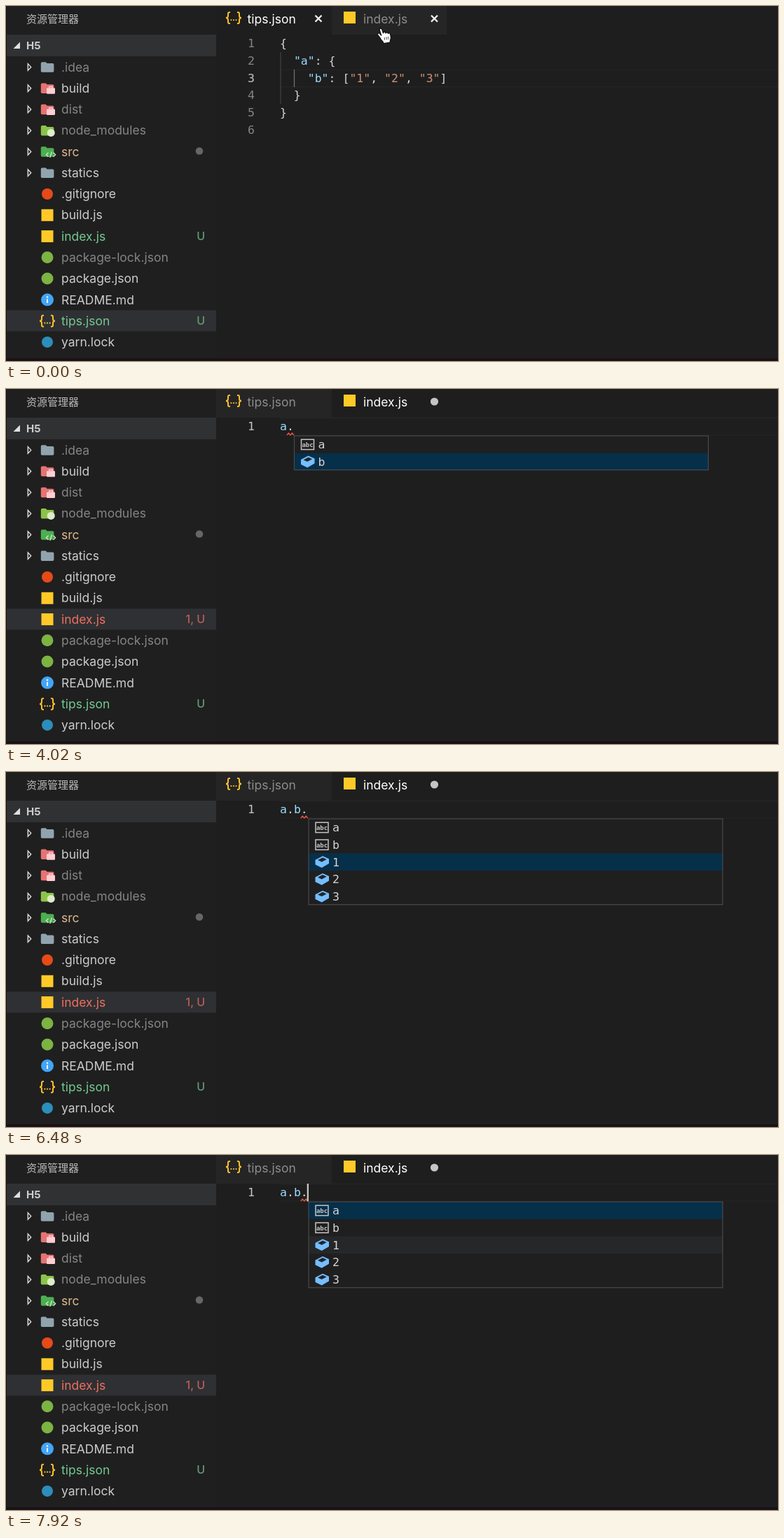
Write an HTML page that moves like this. It is 1102 px wide and 508 px high and loops after 7.98 s.

```html
<!DOCTYPE html>
<html lang="zh">
<head>
<meta charset="utf-8">
<title>Editor completion</title>
<style>
  html, body { margin: 0; width: 100%; height: 100%; overflow: hidden; background: #1e1e1e; }
  svg { display: block; }
  text { white-space: pre; }
  .ui { font: 17.5px Inter, sans-serif; }
  .code { font: 16.5px "DejaVu Sans Mono", monospace; }
</style>
</head>
<body>
<svg id="stage" width="1102" height="508" viewBox="0 0 1102 508"></svg>
<script>
const LOOP = 7980;
const CODE_X = 391, CHAR = 9.93, LINE = 24.7, ROW = 30.27;
const BLUE = '#9cdcfe', ORANGE = '#ce9178', PLAIN = '#d4d4d4';
const GREEN = '#73c991', RED = '#ee6f60', DIM = '#858585', NORMAL = '#cccccc';

const rect = (x, y, w, h, fill, more = '') =>
  `<rect x="${x}" y="${y}" width="${w}" height="${h}" fill="${fill}" ${more}/>`;
const circle = (x, y, r, fill, more = '') =>
  `<circle cx="${x}" cy="${y}" r="${r}" fill="${fill}" ${more}/>`;
const path = (d, fill, more = '') => `<path d="${d}" fill="${fill}" ${more}/>`;
const line = (d, color, w) => path(d, 'none', `stroke="${color}" stroke-width="${w}"`);
const text = (x, y, s, fill, cls = 'ui', more = '') =>
  `<text x="${x}" y="${y}" fill="${fill}" class="${cls}" ${more}>${s}</text>`;
const group = (id, body, x = 0, y = 0) =>
  `<g ${id ? `id="${id}"` : ''} transform="translate(${x} ${y})">${body}</g>`;
const tint = (s, color) => `<tspan fill="${color}">${s}</tspan>`;

// Icons are drawn around their centre.
const folder = color =>
  path('M-7.4-7.2h5.1l1.9 1.9h8q1.8 0 1.8 1.8v9q0 1.8-1.8 1.8h-15q-1.8 0-1.8-1.8v-10.9q0-1.8 1.8-1.8z', color);
const redFolder = folder('#e57373') +
  rect(-1, -0.5, 12, 8.5, '#ffcdd2', 'rx="1.2"') +
  line('M2.7 0v-2.2h4.6v2.2', '#ffcdd2', 1.4);
const icons = {
  grey: folder('#90a4ae'),
  red: redFolder,
  lime: folder('#8bc34a') + circle(5.2, 3.2, 5.5, '#dcedc8'),
  source: folder('#4caf50') +
    line('M1.5 1.2l-3 3 3 3M8.5 1.2l3 3-3 3M6.4 0l-2.6 8.4', '#c8e6c9', 1.5),
  orange: circle(0, 0, 8, '#e64a19'),
  yellow: rect(-8.5, -8.5, 17, 17, '#ffca28'),
  green: circle(0, 0, 8.5, '#7cb342'),
  cyan: circle(0, 0, 8, '#2c8ebb'),
  info: circle(0, 0, 9, '#42a5f5') + rect(-1, -1, 2, 5.5, '#fff') + circle(0, -3.8, 1.2, '#fff'),
  braces: line('M-5-8h-1q-2 0-2 2v3q0 3-3 3q3 0 3 3v3q0 2 2 2h1M5-8h1q2 0 2 2v3q0 3 3 3q-3 0-3 3v3q0 2-2 2h-1', '#fbc02d', 2) +
    [-3.6, 0, 3.6].map(x => circle(x, 3, 1.1, '#fbc02d')).join('')
};
const icon = (name, x, y) => group('', icons[name], x, y);

const files = [
  ['.idea', 'grey', DIM, 1], ['build', 'red', NORMAL, 1], ['dist', 'red', DIM, 1],
  ['node_modules', 'lime', DIM, 1], ['src', 'source', '#deb98c', 1], ['statics', 'grey', NORMAL, 1],
  ['.gitignore', 'orange', NORMAL], ['build.js', 'yellow', NORMAL], ['index.js', 'yellow', GREEN],
  ['package-lock.json', 'green', DIM], ['package.json', 'green', NORMAL],
  ['README.md', 'info', NORMAL], ['tips.json', 'braces', GREEN], ['yarn.lock', 'cyan', NORMAL]
];
const rowY = i => 87.4 + i * ROW;
const mark = (id, y) =>
  text(284, y + 5.8, 'U', '#609c77', 'ui', `id="${id}" text-anchor="end" style="font-size:16px;font-weight:500"`);

function sidebar() {
  const rows = files.map(([name, kind, color, isFolder], i) => {
    const y = rowY(i);
    const arrow = isFolder ? path(`M31.3 ${y - 4.8}l4.4 4.8-4.4 4.8z`, 'none', 'stroke="#ddd" stroke-width="1.4"') : '';
    return arrow + icon(kind, 59, y) + text(79, y + 6.2, name, color, 'ui', `id="file${i}"`);
  }).join('');
  return rect(0, 0, 300, 508, '#1f1f1f') +
    text(29, 23.7, '资源管理器', '#bbb', '', 'style="font:15px \'Noto Sans CJK SC\',\'Noto Sans CJK\',sans-serif"') +
    rect(0, 41, 300, 31, '#303133') +
    path('M20 51.5v9.5h-9.5z', '#e0e0e0') +
    text(29, 62, 'H5', '#ccc', 'ui', 'style="font-size:15px;font-weight:700"') +
    rect(0, 0, 300, 30, '#2f3033', 'id="selected"') + rows +
    circle(276, 207.5, 5.3, '#666') + mark('indexMark', rowY(8)) + mark('tipsMark', rowY(12));
}

const cross = (id, x) => group(id, line('M-4.5-4.5l9 9M4.5-4.5l-9 9', '#f2f2f2', 2.3), x, 18);
const tabs = () =>
  rect(300, 0, 165, 41, '#252526', 'id="tipsTab"') +
  rect(465, 0, 164, 41, '#252526', 'id="indexTab"') +
  icon('braces', 325, 17) + text(344.6, 24.7, 'tips.json', '#fff', 'ui', 'id="tipsName"') +
  icon('yellow', 490.5, 16.5) + text(510, 24.7, 'index.js', '#fff', 'ui', 'id="indexName"') +
  cross('tipsClose', 446) + cross('indexClose', 611.5) +
  circle(611.5, 18, 5.6, '#c5c5c5', 'id="unsaved"');

const baseline = i => 59.3 + i * LINE;
const number = (i, active) =>
  text(355, baseline(i), i + 1, active ? '#c6c6c6' : DIM, 'code', 'text-anchor="end"');
const currentLine = i =>
  line(`M391 ${41.5 + i * LINE}h711M391 ${66.2 + i * LINE}h711`, '#252525', 1.3);

function jsonView() {
  const list = [1, 2, 3].map(n => tint(`"${n}"`, ORANGE)).join(', ');
  const lines = ['{', `  ${tint('"a"', BLUE)}: {`, `    ${tint('"b"', BLUE)}: [${list}]`, '  }', '}', ''];
  return currentLine(2) + line('M392 66v74', '#404040', 1.3) + line('M411.5 91v25', '#707070', 1.3) +
    lines.map((s, i) => number(i, i === 2) + text(CODE_X, baseline(i), s, PLAIN, 'code')).join('');
}

const abc = rect(-9, -7.2, 18, 14.4, 'none', 'stroke="#c5c5c5" stroke-width="1.5"') +
  text(0, 3.4, 'abc', '#c5c5c5', 'code', 'text-anchor="middle" style="font-size:9px;font-weight:700"');
const box = path('M-9.5-3l10.5-5.5 9 4v6.8l-10.3 6-9.2-4.5z', '#75beff') +
  path('M-6-2.7l7-3.7 5.7 2.6-7 3.7z', '#20252b');

function popup(id, x, items, words, hover) {
  const h = items.length * LINE - 0.7;
  const rows = items.map((s, i) => {
    const y = 12.4 + i * LINE;
    return group('', i < words ? abc : box, 19, y) + text(34, y + 5.9, s, PLAIN, 'code');
  }).join('');
  const hovered = hover ? rect(0, hover * LINE, 591, LINE, '#262728') : '';
  return group(id, rect(0, 0, 591, h, '#1f1f20') + hovered +
    rect(0, 0, 591, LINE, '#062f4a', 'class="pick"') + rows +
    rect(0, 0, 591, h, 'none', 'stroke="#4a4a4a" stroke-width="1.2"'), x, 67);
}

const hand = path('M4.5 13L2 9.8q-1.5-2 .4-2.7 1.3-.4 2.5 1.2l1.4 1.7L4.1 2.9q-.5-2 1.1-2.4 1.5-.3 2.1 1.5l1.6 5q.2-1.7 1.7-1.7 1.3 0 1.7 1.7.4-1.2 1.7-1.1 1.2.1 1.6 1.5.4-.8 1.5-.6 1.1.3 1.5 2l.6 3.6q.3 2-.7 3.7l-.5 3.3-8.5 1.5-1-2.5q-2.5-2-4-5.4z',
  '#fff', 'stroke="#111" stroke-width="1.2" stroke-linejoin="round" transform="scale(1.06)"') +
  line('M11 13.200l.8 4M13.800 12.700l.8 4M16.400 12.200l.7 4', '#333', 0.9);

document.getElementById('stage').innerHTML =
  rect(0, 0, 1102, 508, '#1e1e1e') + sidebar() + tabs() +
  group('jsonView', jsonView()) +
  group('jsView', currentLine(0) + number(0, true) +
    text(CODE_X, baseline(0), '', BLUE, 'code', 'id="typed"') +
    group('squiggle', line('M0 66l2.5-3 2.5 3 2.5-3 2.5 3', '#e5533f', 1.4)) +
    rect(0, 41, 2.3, 25.5, '#c4c4c2', 'id="caret"') +
    popup('first', 411.5, ['a', 'b'], 1) +
    popup('second', 432, ['a', 'b', '1', '2', '3'], 2, 2)) +
  rect(0, 504, 1102, 4, '#191217') + rect(0, 0, 1, 508, '#151515') +
  group('hand', hand, 529, 31.5);

const $ = id => document.getElementById(id);
const show = (id, on) => $(id).setAttribute('visibility', on ? 'visible' : 'hidden');
const fill = (id, color) => $(id).setAttribute('fill', color);
const between = (t, a, b) => t >= a && t < b;

// Last step whose time has passed.
const at = (steps, t) => steps.filter(s => s[0] <= t).pop();
const OPEN = 240, BLINK = 480;
const typing = [[0, ''], [OPEN, ''], [1200, 'a'], [2280, 'a.'], [4080, 'a.b'], [4980, 'a.b.']];
const picks = [[0, 0], [3840, 1], [4080, 0], [5820, 1], [5940, 2], [7080, 1], [7200, 0]];

function draw(t) {
  const open = t >= OPEN;
  const [since, code] = at(typing, t);
  const error = between(t, 2700, 4200) || t >= 5520;

  show('jsonView', !open);
  $('jsView').style.display = open ? '' : 'none';
  show('hand', t < 360);
  show('tipsTab', open);
  show('indexTab', !open);
  fill('tipsName', open ? '#8c8c8c' : '#fff');
  fill('indexName', open ? '#fff' : '#8c8c8c');
  show('tipsClose', !open);
  show('indexClose', !code);
  show('unsaved', code);

  $('selected').setAttribute('y', rowY(open ? 8 : 12) - 15.2);
  fill('file8', error ? RED : GREEN);
  fill('indexMark', error ? '#b75f57' : '#609c77');
  $('indexMark').textContent = error ? '1, U' : 'U';

  $('typed').innerHTML = code.replace(/\./g, tint('.', PLAIN));
  $('caret').setAttribute('x', CODE_X - 1 + code.length * CHAR);
  show('caret', Math.floor((t - since) / BLINK) % 2 === 0);
  show('squiggle', error);
  $('squiggle').setAttribute('transform', `translate(${CODE_X + (t < 4980 ? 1 : 3) * CHAR} 0)`);

  $('first').style.display = between(t, 2460, 4080) ? '' : 'none';
  $('second').style.display = t >= 5220 ? '' : 'none';
  for (const el of document.querySelectorAll('.pick')) el.setAttribute('y', at(picks, t)[1] * LINE);
}

function tick() {
  draw(performance.now() % LOOP);
  requestAnimationFrame(tick);
}
tick();
</script>
</body>
</html>
```
